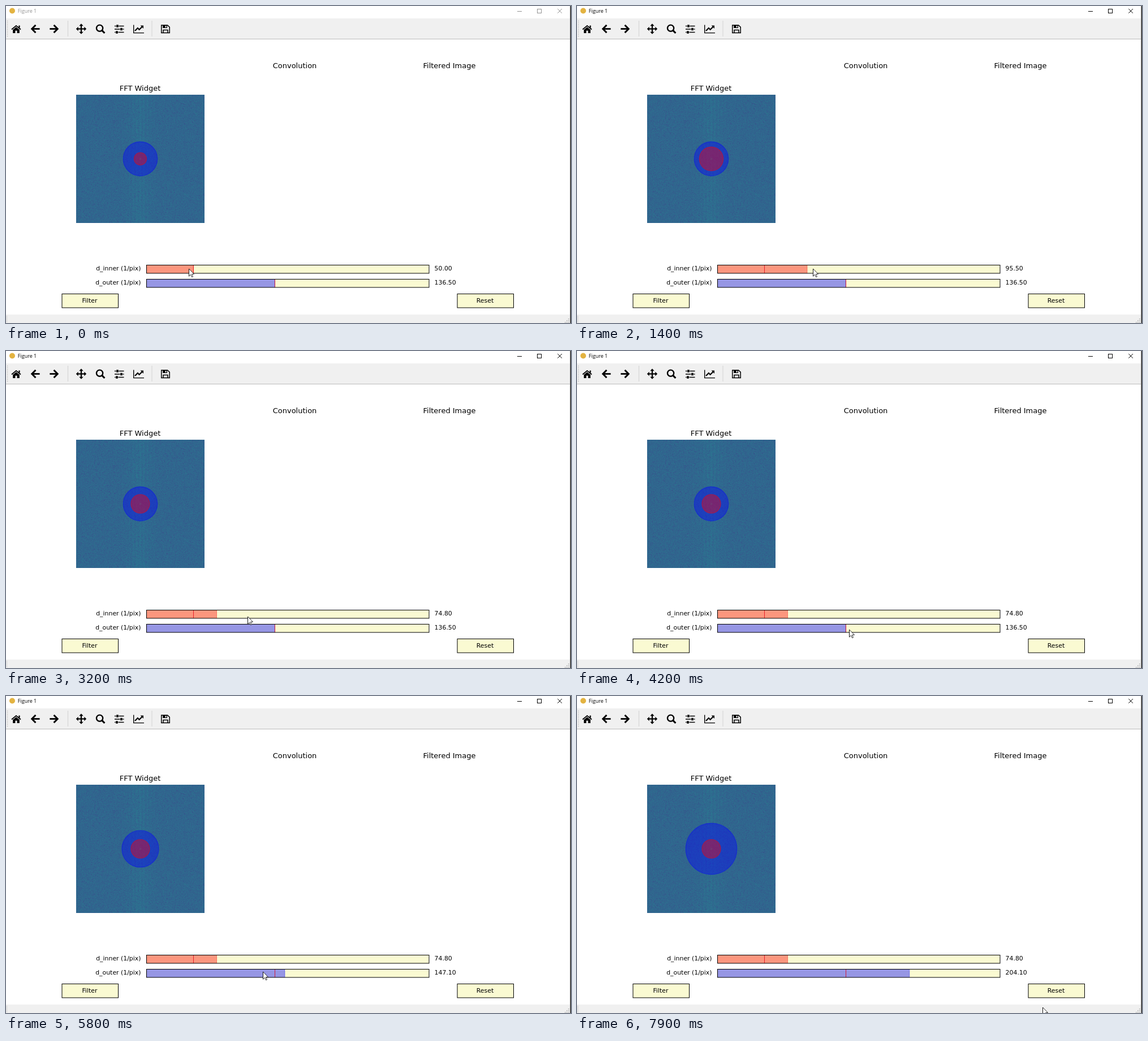
These frames come from a looping animation (999x561 px, 8 s). An HTML page with a canvas:

```html
<!DOCTYPE html>
<html lang="en">
<head>
<meta charset="utf-8">
<title>FFT Widget</title>
<style>
  html, body { margin: 0; width: 100%; height: 100%; overflow: hidden; background: #fff; }
  canvas { display: block; }
</style>
</head>
<body>
<canvas id="stage" width="999" height="561"></canvas>
<script>
const ctx = document.getElementById('stage').getContext('2d');
const LOOP = 8000, STEP = 100, LAG = 200;
const BAR = { x: 248, w: 499.5, h: 14.5, max: 300 };
const PLOT = { x: 124, y: 157, size: 227 };
const PX_PER_UNIT = PLOT.size / 1024;
const CREAM = '#fafad2', GREY = '#f0f0f0', RED = 'rgba(255,0,0,.4)', BLUE = 'rgba(0,0,255,.4)';

// Turning points of the pointer: time, x, y
const stops = [
  [0, 324, 465], [100, 332, 464], [500, 332, 467], [1400, 418, 465], [2400, 280, 460],
  [3700, 501, 512], [4200, 482, 493], [4400, 479, 493], [4600, 479, 493],
  [5165, 654, 492], [5450, 505, 488], [6150, 405, 487], [6600, 488, 487],
  [6750, 588, 487], [7400, 588, 487], [7600, 596, 487], [7900, 824, 551]
];
const innerDrag = { start: 500, end: 3200, from: 50, to: 74.8 };
const outerDrag = { start: 4700, end: 7000, from: 136.5, to: 204.1 };

const smooth = f => f * f * (3 - 2 * f);

function pointer(t) {
  const i = stops.findIndex(s => s[0] >= t);
  const [t1, x1, y1] = stops[i];
  const [t0, x0, y0] = stops[Math.max(0, i - 1)];
  const e = t1 > t0 ? smooth((t - t0) / (t1 - t0)) : 1;
  // vertical drift comes late in each move
  return { x: Math.round(x0 + (x1 - x0) * e), y: Math.round(y0 + (y1 - y0) * e ** 4) };
}

// While dragged, a slider trails the pointer
function dragged({ start, end, from, to }, t) {
  if (t < start) return from;
  if (t >= end) return to;
  return (pointer(t - LAG).x - BAR.x) / BAR.w * BAR.max;
}

function trace(points, g) {
  g.beginPath();
  points.forEach(([x, y]) => g.lineTo(x, y));
}

function line(points, width = 1, color = '#000', g = ctx) {
  trace(points, g);
  g.lineWidth = width;
  g.strokeStyle = color;
  g.stroke();
}

function shape(points, color, g = ctx) {
  trace(points, g);
  g.fillStyle = color;
  g.fill();
}

function rect(x, y, w, h, color, g = ctx) {
  g.fillStyle = color;
  g.fillRect(x, y, w, h);
}

function frame(x, y, w, h, g = ctx) {
  g.strokeStyle = '#000';
  g.lineWidth = 1;
  g.strokeRect(x, y, w, h);
}

function text(str, x, y, size, align = 'left', g = ctx) {
  g.font = `${size}px "DejaVu Sans", sans-serif`;
  g.textAlign = align;
  g.fillStyle = '#000';
  g.fillText(str, x, y);
}

function layer(w, h, paint) {
  const c = document.createElement('canvas');
  c.width = w;
  c.height = h;
  paint(c.getContext('2d'));
  return c;
}

// Noisy power spectrum with faint vertical streaks
const spectrum = layer(PLOT.size, PLOT.size, g => {
  const n = PLOT.size, img = g.createImageData(n, n);
  let seed = 7;
  const rand = () => (seed = (seed * 16807) % 2147483647) / 2147483647;
  for (let y = 0; y < n; y++) {
    for (let x = 0; x < n; x++) {
      const dx = x - n / 2 + 0.5, dy = y - n / 2 + 0.5;
      const glow = Math.exp(-dx * dx / 400);
      const streak = Math.max(0, Math.cos(dx)) * glow;
      let v = (rand() + rand() - 1) * 13 + 4 * glow + 6 * streak;
      if (rand() < 0.04) v -= 18;
      if (dx * dx + dy * dy < 3) v += 40;
      img.data.set([48 - v * 0.3, 102 + v, 142 + v * 0.15, 255], (y * n + x) * 4);
    }
  }
  g.putImageData(img, 0, 0);
});

function toolbarIcons(g) {
  const ink = '#000';
  // home
  line([[10, 41.5], [18, 34.8], [26, 41.5]], 1.8, ink, g);
  rect(22.4, 34.5, 2.2, 4, ink, g);
  shape([[12.2, 42], [18, 37.2], [23.8, 42], [23.8, 48], [12.2, 48]], ink, g);
  rect(16.4, 43.6, 3.2, 4.4, GREY, g);
  // back and forward
  for (const [x, d] of [[45.8, 1], [91.2, -1]]) {
    line([[x + 6.6 * d, 33.8], [x, 40.5], [x + 6.6 * d, 47.2]], 3, ink, g);
    line([[x + d, 40.5], [x + 13.8 * d, 40.5]], 2.8, ink, g);
  }
  // pan
  for (let i = 0; i < 4; i++) {
    g.save();
    g.translate(133, 40.5);
    g.rotate(i * Math.PI / 2);
    rect(-1.1, -7, 2.2, 7, ink, g);
    shape([[0, -9.2], [3.7, -5.3], [-3.7, -5.3]], ink, g);
    g.restore();
  }
  // zoom
  g.beginPath();
  g.arc(165.6, 39.2, 5.6, 0, 7);
  g.lineWidth = 2.4;
  g.stroke();
  line([[169.6, 43.2], [174.4, 48]], 3.1, ink, g);
  // subplot sliders
  [197, 204, 196].forEach((knob, i) => {
    const y = 35.5 + i * 5.5;
    line([[192, y], [208.5, y]], 1.5, ink, g);
    rect(knob - 2.5, y - 2.4, 5, 4.8, GREY, g);
    rect(knob - 1.8, y - 2.2, 3.6, 4.4, ink, g);
  });
  // chart
  line([[225.7, 33.5], [225.7, 47.6], [244, 47.6]], 1.4, ink, g);
  line([[228, 44], [232.8, 39], [235.6, 41.8], [241, 36.4]], 2.1, ink, g);
  shape([[237.6, 34.5], [243, 34.5], [243, 39.9]], ink, g);
  // save
  line([[274.8, 33.9], [285.6, 33.9], [289.2, 37.4], [289.2, 47.4], [274.8, 47.4],
        [274.8, 33.2]], 1.5, ink, g);
  rect(277.2, 34, 7.8, 5, ink, g);
  rect(281.6, 35, 2, 3, GREY, g);
  line([[278, 47], [278, 42.6], [286, 42.6], [286, 47]], 1.5, ink, g);
}

function button(label, x, g) {
  rect(x, 509.5, 99.5, 24.5, CREAM, g);
  frame(x, 509.5, 99.5, 24.5, g);
  text(label, x + 49, 525, 10.9, 'center', g);
}

const backdrop = layer(999, 561, g => {
  rect(0, 0, 999, 561, '#fff', g);
  g.beginPath();
  g.arc(11, 8.5, 5, 0, 7);
  g.fillStyle = '#e3b341';
  g.fill();

  rect(0, 22, 997, 36, GREY, g);
  rect(0, 58, 997, 1, '#bcbcbc', g);
  for (let y = 26; y < 55; y += 3) rect(2, y, 1.2, 1.2, '#b0b0b0', g);
  for (const x of [109, 257.5]) rect(x, 26, 1, 28, '#d2d2d2', g);
  toolbarIcons(g);

  rect(0, 546, 997, 15, GREY, g);
  rect(1, 548, 1, 12, '#d4d4d4', g);
  for (let i = 0; i < 3; i++)
    for (let j = 0; j <= i; j++) rect(994 - j * 3, 553 + i * 3, 1.6, 1.6, '#b4b4b4', g);
  rect(997.5, 0, 1.5, 561, '#222', g);

  text('Convolution', 510.5, 110, 13, 'center', g);
  text('Filtered Image', 784, 110, 13, 'center', g);
  text('FFT Widget', 237, 150, 13, 'center', g);
  g.drawImage(spectrum, PLOT.x, PLOT.y);
  text('d_inner (1/pix)', 238.5, 468, 10.9, 'right', g);
  text('d_outer (1/pix)', 238.5, 493, 10.9, 'right', g);
  button('Filter', 99, g);
  button('Reset', 798, g);
});

function titleBar(active) {
  const ink = active ? '#000' : '#929292';
  ctx.font = '9px "Open Sans", sans-serif';
  ctx.textAlign = 'left';
  ctx.fillStyle = ink;
  ctx.fillText('Figure 1', 20.8, 12);
  line([[904, 9.5], [912, 9.5]], 1, ink);
  ctx.strokeRect(939.5, 5.5, 7, 7);
  line([[975.3, 5], [983, 12.7]], 1, ink);
  line([[983, 5], [975.3, 12.7]], 1, ink);
}

function disc(value, color) {
  const half = PLOT.size / 2;
  ctx.beginPath();
  ctx.arc(PLOT.x + half, PLOT.y + half, value * PX_PER_UNIT, 0, 7);
  ctx.fillStyle = ctx.strokeStyle = color;
  ctx.lineWidth = 1.3;
  ctx.fill();
  ctx.stroke();
}

function slider(y, value, initial, color) {
  const { x, w, h, max } = BAR;
  const end = value / max * w;
  rect(x, y, w, h, CREAM);
  rect(x, y, end, h, color);
  line([[x + end, y], [x + end, y + h]], 1, color);
  rect(Math.floor(x + initial / max * w), y, 1, h, 'rgba(225,0,20,.8)');
  frame(x + 0.5, y, w, h);
  text(value.toFixed(1) + '0', 757.6, y + 9.5, 10.9);
}

function cursor({ x, y }) {
  ctx.save();
  ctx.translate(x - 0.5, y);
  const arrow = [[0, 0], [0, 13.2], [3, 10.4], [5.1, 14.8], [7, 13.9], [5, 9.6], [9, 9.4]];
  shape(arrow, '#fff');
  line([...arrow, arrow[0], arrow[1]], 0.85, '#111');
  ctx.restore();
}

function draw(t) {
  const inner = dragged(innerDrag, t), outer = dragged(outerDrag, t);
  ctx.drawImage(backdrop, 0, 0);
  titleBar(t >= innerDrag.start);
  disc(outer, BLUE);
  disc(inner, RED);
  slider(458.5, inner, innerDrag.from, RED);
  slider(483.5, outer, outerDrag.from, BLUE);
  cursor(pointer(t));
}

const start = performance.now();
function tick() {
  const t = (performance.now() - start) % LOOP;
  draw(Math.floor(t / STEP) * STEP);
  requestAnimationFrame(tick);
}
tick();
</script>
</body>
</html>
```
